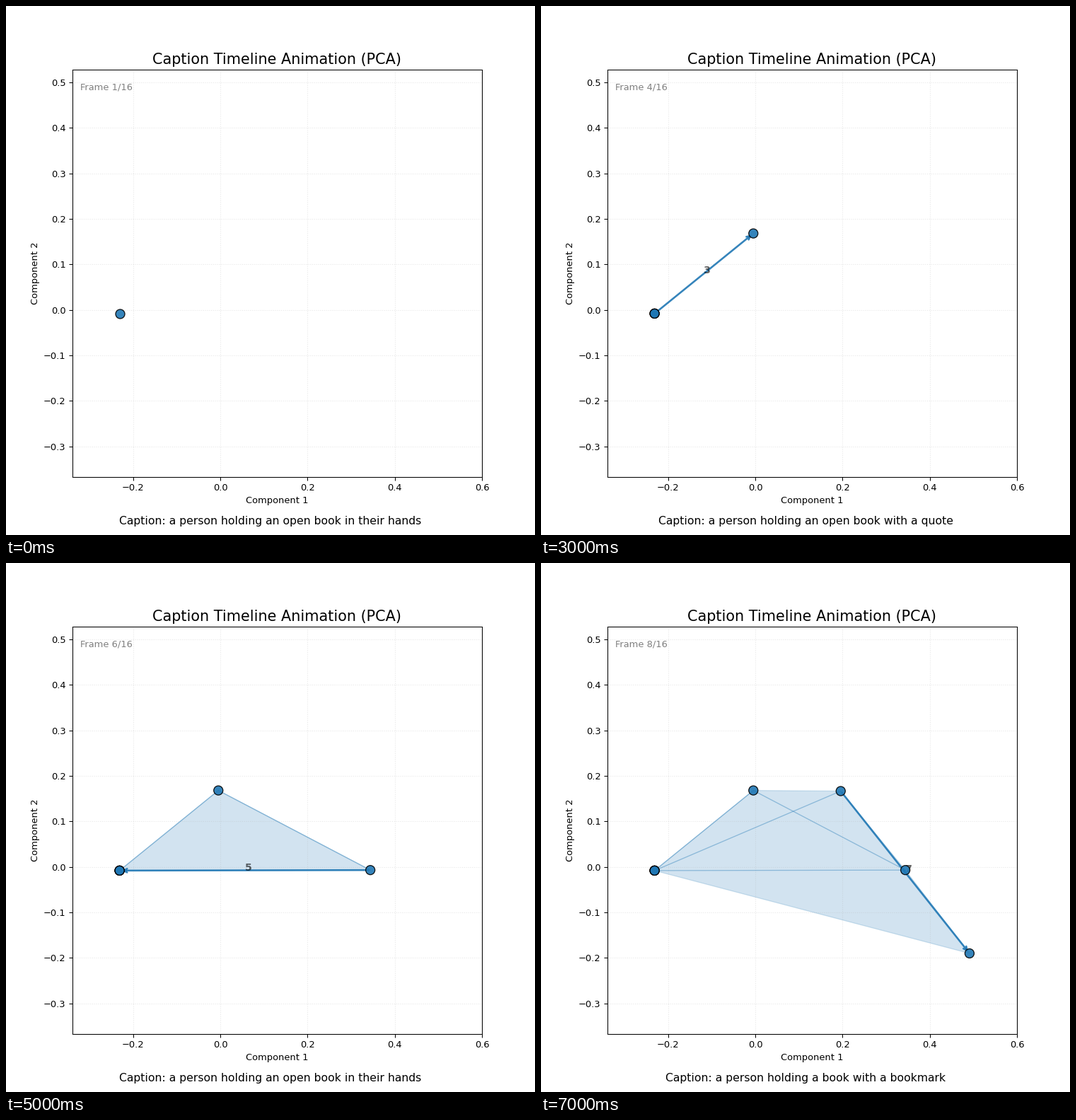
A matplotlib script for the animation above (8 s loop, 748 by 748 pixels).

```python
import matplotlib.pyplot as plt
from matplotlib.animation import FuncAnimation

INCHES, DPI = 8, 93.5
STEPS, TOTAL, INTERVAL = 8, 16, 1000
BLUE = "#1f77b4"

HANDS = "a person holding an open book in their hands"
QUOTE = "a person holding an open book with a quote"
MARKED = "a person holding an open book with a bookmark"
PAGE = "a person holding a book with a page in it"
BOOKMARK = "a person holding a book with a bookmark"

PLACES = {
    HANDS: (-0.2312, -0.0081),
    QUOTE: (-0.0047, 0.1681),
    MARKED: (0.3438, -0.0070),
    PAGE: (0.1956, 0.1667),
    BOOKMARK: (0.4910, -0.1902),
}
TIMELINE = [HANDS, HANDS, HANDS, QUOTE, MARKED, HANDS, PAGE, BOOKMARK]

fig, ax = plt.subplots(figsize=(INCHES, INCHES), dpi=DPI)
caption = fig.text(0.5, 0.02, "", ha="center", fontsize=12)


def turns_left(a, b, c):
    return (b[0] - a[0]) * (c[1] - a[1]) > (b[1] - a[1]) * (c[0] - a[0])


def half_hull(points):
    chain = []
    for point in points:
        while len(chain) > 1 and not turns_left(*chain[-2:], point):
            chain.pop()
        chain.append(point)
    return chain[:-1]


def convex_hull(points):
    points = sorted(set(points))
    return half_hull(points) + half_hull(points[::-1])


def setup_axes():
    ax.clear()
    ax.set_xlim(-0.3400, 0.6001)
    ax.set_ylim(-0.3670, 0.5286)
    ax.set_title("Caption Timeline Animation (PCA)", fontsize=16)
    ax.set_xlabel("Component 1")
    ax.set_ylabel("Component 2")
    ax.grid(True, linestyle=":", alpha=0.3)


def draw_current_step(start, end, number):
    if start != end:
        ax.annotate("", xy=end, xytext=start, zorder=3,
                    arrowprops=dict(arrowstyle="->", color=BLUE,
                                    lw=2, alpha=0.9))
    mid_x, mid_y = (start[0] + end[0]) / 2, (start[1] + end[1]) / 2
    ax.text(mid_x, mid_y, str(number), fontsize=11, fontweight="bold",
            color="black", alpha=0.6, zorder=3)


def update(step):
    setup_axes()
    points = [PLACES[text] for text in TIMELINE[:step + 1]]

    if len(set(points)) > 2:
        ax.fill(*zip(*convex_hull(points)), color=BLUE, alpha=0.2, lw=1,
                zorder=1)

    # Earlier steps stay as thin lines
    for start, end in zip(points[:-2], points[1:-1]):
        if start != end:
            ax.plot(*zip(start, end), color=BLUE, lw=1, alpha=0.4, zorder=2)
    if step:
        draw_current_step(points[-2], points[-1], step)

    ax.scatter(*zip(*points), s=100, c=[BLUE] * len(points),
               edgecolors="black", linewidths=1, alpha=0.9, zorder=4)
    ax.text(0.02, 0.95, f"Frame {step + 1}/{TOTAL}", fontsize=10,
            color="gray", transform=ax.transAxes)
    caption.set_text(f"Caption: {TIMELINE[step]}")
    return []


anim = FuncAnimation(fig, update, frames=STEPS, interval=INTERVAL,
                     init_func=lambda: update(0), repeat=True,
                     repeat_delay=0, blit=False)
plt.show()
```
